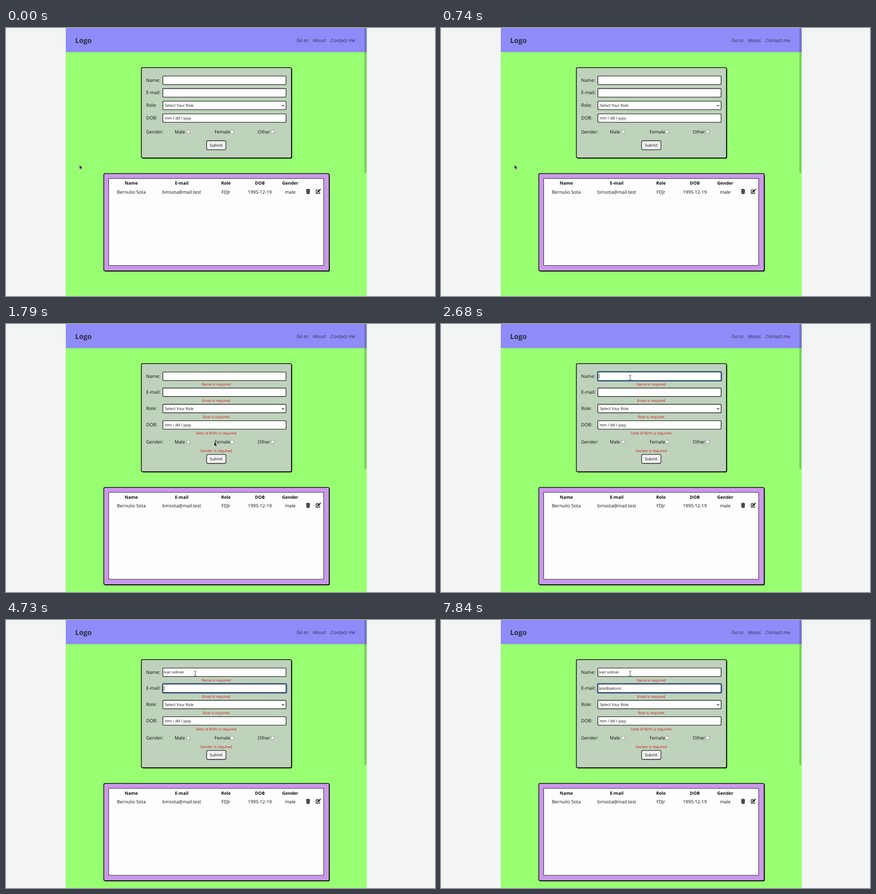
These frames come from a looping animation (946x592 px, 8000 ms). An HTML page:

```html
<!DOCTYPE html>
<html lang="en">
<head>
<meta charset="utf-8">
<title>Form validation</title>
<style>
  html, body { margin: 0; width: 100%; height: 100%; overflow: hidden; background: #f3f5f4; }
  svg { display: block; width: 946px; height: 592px; }
  text { font: 10.15px "Open Sans", "Noto Sans", sans-serif; white-space: pre; text-rendering: geometricPrecision; fill: #0c0f0c; }
  .logo { font-size: 15.4px; font-weight: 700; fill: #2a2b42; }
  .nav { fill: #2a2b42; }
  .head { font-size: 9.7px; font-weight: 700; }
  .small { font-size: 8.45px; }
  .error { font-size: 8px; fill: #d4141c; }
  .mid { text-anchor: middle; }
  .field { fill: #fefefe; stroke: #1e221e; stroke-width: 1.4; }
  .panel { stroke: #050505; stroke-width: 1.5; }
</style>
</head>
<body>
<svg id="stage" viewBox="0 0 946 592">
  <defs>
    <linearGradient id="bar" x2="0" y2="1">
      <stop stop-color="#3b3b3b"/><stop offset="1" stop-color="#171717"/>
    </linearGradient>
    <filter id="soft" x="-5%" y="-5%" width="110%" height="110%"><feGaussianBlur stdDeviation=".6"/></filter>
  </defs>
  <rect width="946" height="592" fill="#f3f5f4"/>
  <rect x="131.2" y="-2" width="664.6" height="596" fill="#fefefe" stroke="#dcdedc" stroke-width=".8"/>

  <g id="page">
    <rect x="132" width="663.5" height="592" fill="#98ff72"/>
    <rect x="132" width="663.5" height="53.3" fill="#8f8bf8"/>
    <rect x="790.3" y="1" width="4.4" height="319" rx="1" fill="#000" opacity=".2"/>
    <g id="header"></g>
    <g id="form"></g>
    <g id="errors"></g>
    <g id="table"></g>
  </g>

  <g id="status">
    <path d="M0 583.5H154q2 0 2 2V592H0z" fill="url(#bar)"/>
    <text x="0" y="593" style="font-size:9.3px;fill:#e4e4e4">ost</text>
  </g>

  <path id="arrow" d="M0 0V10.2L2.4 8.1 4 11.8 5.7 11 4.1 7.5H7.2z" fill="#1c1c1c" stroke="#e9ece9" stroke-width=".7" stroke-linejoin="round"/>
  <path id="beam" d="M-2.3 -5H-.6L0 -4.4.6 -5H2.3M0 -4.4V4.4M-2.3 5H-.6L0 4.4.6 5H2.3" fill="none" stroke="#333" stroke-width="1"/>
</svg>

<script>
const LOOP = 8000, TICK = 80;
const $ = id => document.getElementById(id);

function add(parent, tag, attrs, label) {
  const node = document.createElementNS("http://www.w3.org/2000/svg", tag);
  for (const key in attrs) node.setAttribute(key, attrs[key]);
  if (label !== undefined) node.textContent = label;
  return parent.appendChild(node);
}
const write = (parent, x, y, label, cls = "") => add(parent, "text", { x, y, class: cls }, label);
const box = (parent, x, y, width, height, rx, attrs) =>
  add(parent, "rect", { x, y, width, height, rx, ...attrs });
const show = (node, on) => node.setAttribute("visibility", on ? "visible" : "hidden");
const move = (node, x, y) => node.setAttribute("transform", `translate(${x} ${y})`);

// Header
write($("header"), 152.5, 32.6, "Logo", "logo");
[[641, "Go to"], [676.5, "About"], [716, "Contact me"]].forEach(([x, s]) => write($("header"), x, 30.5, s, "nav"));

// Form: each row slides down by its own amount once the errors show
const form = $("form");
const panelShadow = box(form, 300, 89, 331, 199.5, 3, { fill: "#0a140a", filter: "url(#soft)" });
const panel = box(form, 298.5, 87.5, 331, 199.5, 3, { class: "panel", fill: "#bfd2bc" });
const sliding = [];
function row(shift) {
  const g = add(form, "g", {});
  sliding.push([g, shift]);
  return g;
}
function fieldRow(label, y, shift) {
  const g = row(shift);
  write(g, 309, y + 13, label);
  const ring = box(g, 345.4, y - .1, 273, 20, 2.5, { fill: "none", stroke: "#3a72bd", "stroke-width": 3 });
  box(g, 345.8, y + .4, 271.8, 18.8, 1.5, { class: "field" });
  const value = write(g, 348, y + 12.6, "", "small");
  value.style.fontSize = "8.3px";
  const caret = box(g, 0, y + 4.8, .9, 10, 0, { fill: "#111" });
  return { ring, value, caret, g, y };
}
const nameField = fieldRow("Name:", 105.7, 0);
const mailField = fieldRow("E-mail:", 133.4, 7.7);
const roleField = fieldRow("Role:", 161.2, 15.9);
const dateField = fieldRow("DOB:", 189.2, 24);
for (const f of [roleField, dateField]) { show(f.ring, false); show(f.caret, false); }
write(roleField.g, 350.7, 174.2, "Select Your Role", "small");
add(roleField.g, "path", { d: "M608.4 169.8l2.6 2.7 2.6-2.7", fill: "none", stroke: "#111", "stroke-width": 1.2 });
write(dateField.g, 350, 202, "mm / dd / yyyy", "small");

const gender = row(31.3);
write(gender, 309, 232.5, "Gender:");
[[372, 402, "Male"], [460, 498.5, "Female"], [555, 588, "Other"]].forEach(([x, cx, s]) => {
  write(gender, x, 232.5, s);
  add(gender, "circle", { cx, cy: 229, r: 4, fill: "#fefefe", stroke: "#767676", "stroke-width": .9 });
});

const submit = row(39.2);
box(submit, 442.4, 249, 42.6, 19.8, 3, { fill: "#efefef", stroke: "#1e221e", "stroke-width": 1.3 });
write(submit, 463.5, 262.2, "Submit", "small mid");

[["Name", 136], ["Email", 171.8], ["Role", 207.7], ["Date of Birth", 243.7], ["Gender", 283]]
  .forEach(([s, y]) => write($("errors"), 463.5, y, s + " is required", "error mid"));

// Table
const table = $("table");
sliding.push([table, 39.3]);
box(table, 217, 323, 497, 215, 3, { fill: "#0a140a", filter: "url(#soft)" });
box(table, 215.6, 321.6, 497, 214.8, 3, { class: "panel", fill: "#cb98ea" });
box(table, 226.5, 332.6, 474, 192, 0, { fill: "#fefefe", stroke: "#111", "stroke-width": .9 });
[[276.3, "Name", "Bernulio Sota"], [387.5, "E-mail", "bmsota@mail.test"], [485, "Role", "FDJr"],
 [559.7, "DOB", "1995-12-19"], [626.8, "Gender", "male"]].forEach(([x, head, cell]) => {
  write(table, x, 346.4, head, "head mid");
  write(table, x, 365.8, cell, "mid");
});
// Trash can and edit icons
add(table, "path", { d: "M661.6 356.6h2.7l.6-1h2.4l.6 1h2.7v1.4h-9zM662.2 358.7h7.8l-.5 6.8q-.1.9-1 .9h-4.8q-.9 0-1-.9z", fill: "#080808" });
add(table, "path", { d: "M664.2 360v5M666.1 360v5M668 360v5", stroke: "#fefefe", "stroke-width": .6 });
add(table, "path", { d: "M689 357.7h-4.2q-.9 0-.9.9v6q0 .9.9.9h6q.9 0 .9-.9v-2.6", fill: "none", stroke: "#080808", "stroke-width": 1.3 });
add(table, "path", { d: "M686.4 361.3l4.6-4.6 2 2-4.6 4.6-2.3.3zM691.5 356.2l.7-.7q.5-.4 1 0l1 1q.4.5 0 1l-.7.7z", fill: "#080808" });

// [time, text, caret visible]
const nameSteps = [
  [0, "", 0], [2350, "", 1], [3090, "i", 1], [3170, "iv", 1], [3250, "ivan", 0],
  [3750, "ivan ", 1], [3830, "ivan s", 1], [3910, "ivan so", 1], [3990, "ivan sob", 1],
  [4070, "ivan sobn", 1], [4320, "ivan sobner", 0]
];
const mailSteps = [
  [0, "", 0], [4730, "", 1], [5480, "", 0], [5720, "l", 1], [5880, "la", 1], [5960, "lala", 1],
  [6200, "lalal", 0], [6280, "lalal", 1], [6780, "lalal@", 1], [7110, "lalal@", 0],
  [7440, "lalal@p", 1], [7520, "lalal@pe", 1], [7600, "lalal@pelu", 1],
  [7760, "lalal@pelum", 1], [7840, "lalal@pelumi", 0]
];
const FOCUS_NAME = 2350, FOCUS_MAIL = 4730, ERRORS = 1710;

const at = (steps, t) => steps.reduce((last, s) => s[0] <= t ? s : last);

function drawField(field, steps, t, focused) {
  const [, label, caret] = at(steps, t);
  if (field.value.textContent !== label) field.value.textContent = label;
  const width = label ? field.value.getComputedTextLength() : 0;
  field.caret.setAttribute("x", 348.2 + width);
  show(field.caret, focused && caret);
  show(field.ring, focused);
}

// Pointer advances in ticks between its resting places
function pointer(t) {
  const part = (start, ticks) => Math.max(0, Math.min(1, (Math.floor((t - start) / TICK) + 1) / ticks));
  const p = part(1070, 7), q = part(2030, 3);
  const ease = p * p * (3 - 2 * p);
  return [162 + 297 * ease - 39.5 * q, 302 - 42 * ease - 140.5 * q];
}

function draw(t) {
  const blank = t >= 580 && t < 740;
  const errors = t >= ERRORS;
  $("page").style.display = blank ? "none" : "";
  $("status").style.display = blank ? "" : "none";
  $("errors").style.display = errors ? "" : "none";
  for (const [g, shift] of sliding) move(g, 0, errors ? shift : 0);
  for (const r of [panel, panelShadow]) r.setAttribute("height", errors ? 238.7 : 199.5);

  drawField(nameField, nameSteps, t, t >= FOCUS_NAME && t < FOCUS_MAIL);
  drawField(mailField, mailSteps, t, t >= FOCUS_MAIL);

  const typing = t >= FOCUS_NAME;
  show($("arrow"), !typing);
  show($("beam"), typing);
  move($("arrow"), ...pointer(t));
  move($("beam"), ...(t < 2680 ? [419, 121] : [417.2, 118.3]));
}

const start = performance.now();
function loop() {
  draw((performance.now() - start) % LOOP);
  requestAnimationFrame(loop);
}
draw(0);
requestAnimationFrame(loop);
</script>
</body>
</html>
```
